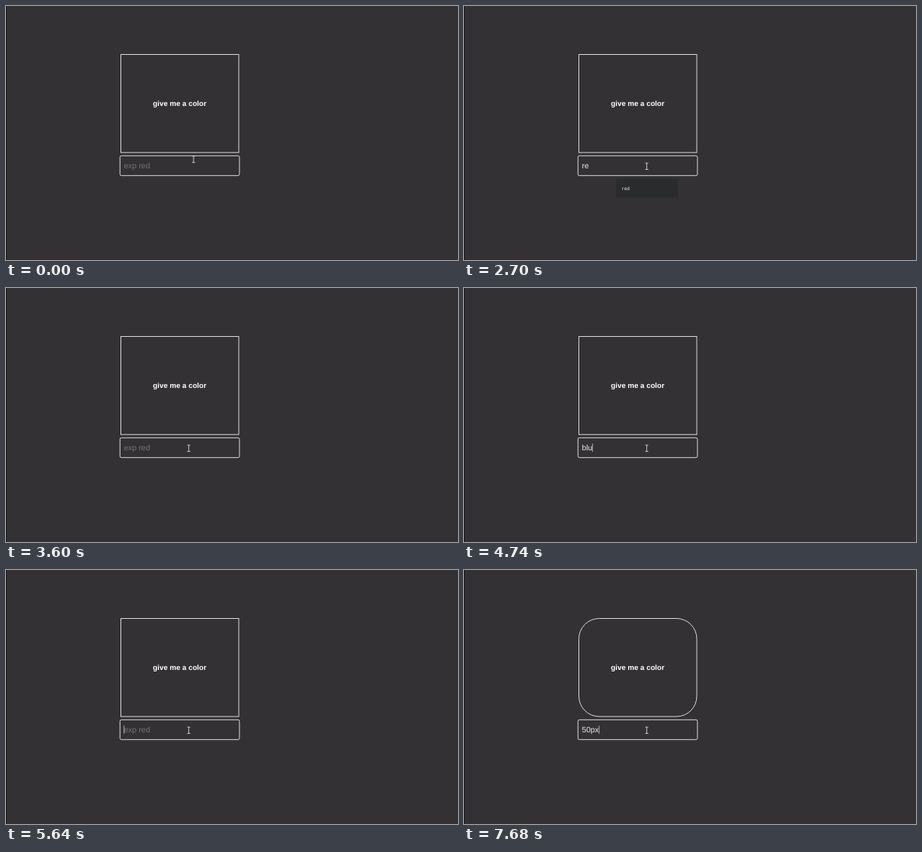
An HTML page for the animation above (8 s loop, 600 px wide and 338 px high).

```html
<!DOCTYPE html>
<html lang="en">
<head>
<meta charset="utf-8">
<title>Give me a color</title>
<style>
  html, body { margin: 0; width: 100%; height: 100%; overflow: hidden; background: #333133; }
  svg { display: block; width: 600px; height: 338px; }
  text { font-family: "Liberation Sans", Arial, sans-serif; text-rendering: geometricPrecision; }
  #box, #field { fill: none; stroke: #dcdcdc; }
  #title { font-size: 9.75px; font-weight: bold; fill: #fff; text-anchor: middle; }
  #value { font-size: 10.4px; fill: #eee; }
  #value.hint { fill: #777577; }
  #caret { stroke: #c8c8c8; stroke-width: .8; }
  #popup rect { fill: #2a2b2d; }
  #popup text { font: 6.1px "DejaVu Sans Mono", monospace; fill: #e8e8e8; }
  #pointer { fill: none; stroke: #d8d8d8; stroke-width: .9; }
</style>
</head>
<body>
<svg viewBox="0 0 600 338">
  <rect width="600" height="338" fill="#333133"/>
  <rect width="1" height="338" fill="#141314"/>
  <rect id="box" x="152.5" y="64.5" width="156.5" height="130.5"/>
  <text id="title" x="230.6" y="132.8">give me a color</text>
  <rect id="field" x="151.3" y="199.3" width="158.6" height="26.4" rx="2"/>
  <text id="value" x="156.5" y="216.2"></text>
  <path id="caret" d="M0 207V218"/>
  <g id="popup">
    <rect x="202" y="230.5" width="82" height="24.5" rx="2"/>
    <text x="209" y="244.8">red</text>
  </g>
  <path id="pointer" d="M-2 -4.2H2M0 -4.2V4.2M-2 4.2H2"/>
</svg>
<script>
  const LOOP = 8000;
  const [box, value, caret, popup, pointer] =
    ["box", "value", "caret", "popup", "pointer"].map(id => document.getElementById(id));

  // Each entry holds from its time on; omitted properties keep their value.
  const steps = [
    { at: 0, text: "", caret: false, popup: false, fill: "none", radius: 0, pointer: [249, 204] },
    { at: 60, pointer: [242.6, 213.3] },
    { at: 240, popup: true },
    { at: 300, caret: true },
    { at: 720, caret: false },
    { at: 1020, caret: true },
    { at: 1380, caret: false },
    { at: 1800, text: "r", caret: true },
    { at: 2160, caret: false },
    { at: 2340, text: "re", caret: true },
    { at: 2700, caret: false },
    { at: 2940, text: "red", caret: true, fill: "#f00" },
    { at: 3000, popup: false },
    { at: 3300, caret: false },
    { at: 3600, text: "", fill: "none" },
    { at: 3660, caret: true },
    { at: 4020, caret: false },
    { at: 4200, text: "b", caret: true },
    { at: 4320, text: "bl" },
    { at: 4680, caret: false },
    { at: 4740, text: "blu", caret: true },
    { at: 4860, text: "blue", fill: "#00f" },
    { at: 5220, caret: false },
    { at: 5580, text: "", fill: "none" },
    { at: 5640, caret: true },
    { at: 5940, caret: false },
    { at: 6240, caret: true },
    { at: 6660, caret: false },
    { at: 6900, text: "5", caret: true },
    { at: 6960, text: "50" },
    { at: 7320, caret: false },
    { at: 7560, text: "50p", caret: true },
    { at: 7680, text: "50px", radius: 27 }
  ];

  const show = (node, on) => node.setAttribute("visibility", on ? "visible" : "hidden");

  function draw(time) {
    const state = Object.assign({}, ...steps.filter(step => step.at <= time));
    value.textContent = state.text || "exp red";
    value.classList.toggle("hint", !state.text);
    const width = state.text ? value.getComputedTextLength() : 0;
    caret.setAttribute("transform", `translate(${156.7 + width})`);
    show(caret, state.caret);
    show(popup, state.popup);
    box.style.fill = state.fill;
    box.setAttribute("rx", state.radius);
    pointer.setAttribute("transform", `translate(${state.pointer})`);
  }

  function tick() {
    draw(performance.now() % LOOP);
    requestAnimationFrame(tick);
  }
  tick();
</script>
</body>
</html>
```
